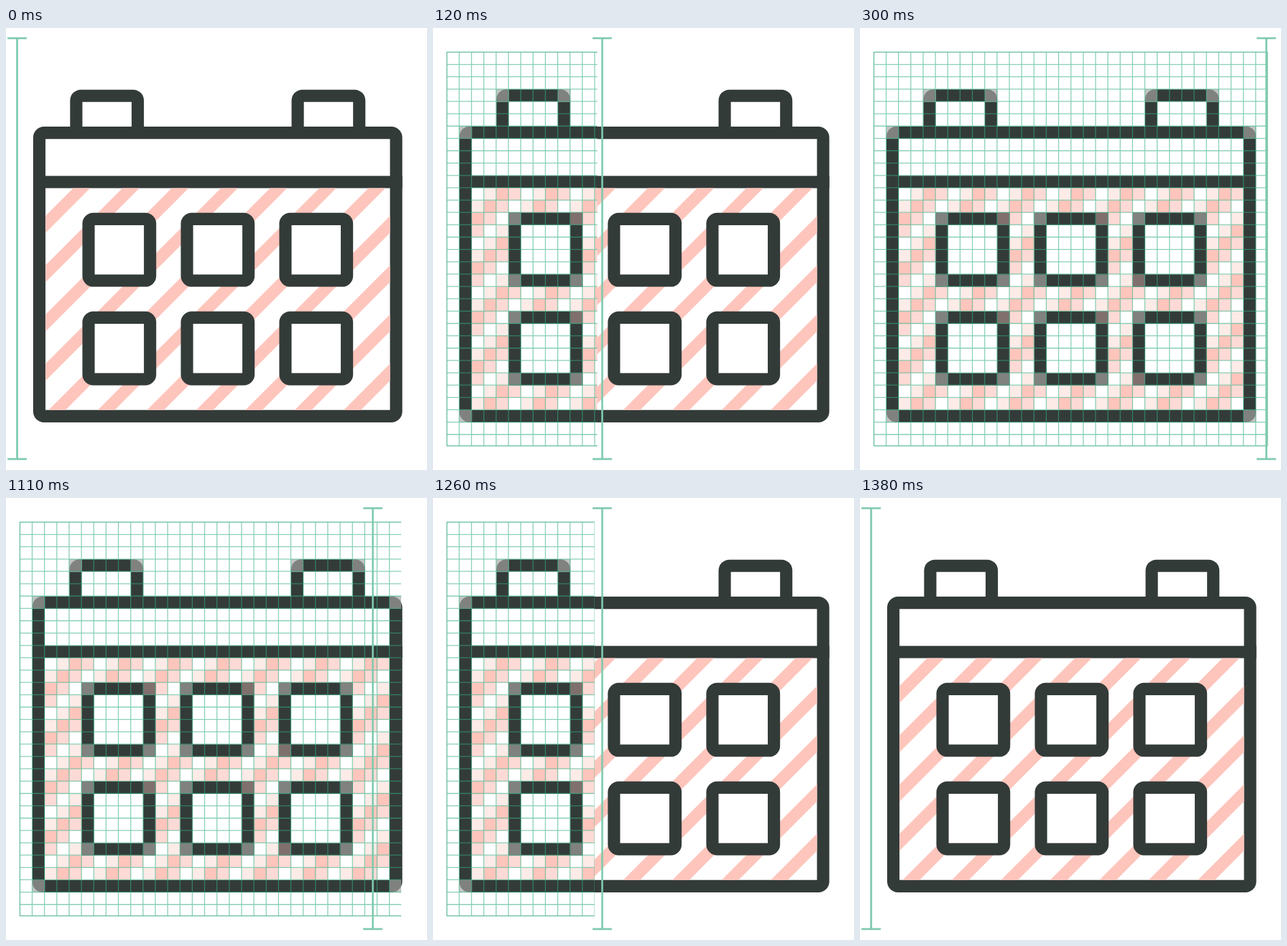
Animation, 620 px wide and 650 px high, one loop 2.25 s. Source, as an HTML page with a canvas:

```html
<!DOCTYPE html>
<html lang="en">
<head>
<meta charset="utf-8">
<title>Calendar icon on a pixel grid</title>
<style>
  html, body { margin: 0; width: 100%; height: 100%; overflow: hidden; background: #fff; }
  canvas { display: block; }
</style>
</head>
<body>
<canvas id="stage" width="620" height="650"></canvas>
<script>
const ctx = document.getElementById('stage').getContext('2d');
const DARK = '#333b39', PINK = '#fec5bc', GREEN = '#7fcaae';
const LOOP = 2250, STEP = 30;

// Outlines in grid units: column, row, width, height
const BODY = [1, 6, 30, 24];
const TABS = [[4, 3, 6, 4], [22, 3, 6, 4]];
const DAYS = [13, 21].flatMap(row => [5, 13, 21].map(col => [col, row, 6, 6]));

function layer(draw) {
  const canvas = document.createElement('canvas');
  canvas.width = 620;
  canvas.height = 650;
  draw(canvas.getContext('2d'));
  return canvas;
}

const smooth = layer(g => {
  const unit = 18.12;
  const X = col => 21.9 + unit * col;
  const Y = row => 36.3 + unit * row;
  const box = (col, row, w, h, color, radius = 0) => {
    g.fillStyle = color;
    g.beginPath();
    g.roundRect(X(col), Y(row), w * unit, h * unit, radius);
    g.fill();
  };
  const frame = ([col, row, w, h]) => {
    box(col, row, w, h, DARK, 16);
    box(col + 1, row + 1, w - 2, h - 2, '#fff');
  };

  TABS.forEach(frame);
  frame(BODY);
  box(1, 10, 30, 1, DARK);

  g.save();
  g.beginPath();
  g.rect(X(2), Y(11), 28 * unit, 18 * unit);
  g.clip();
  g.strokeStyle = PINK;
  g.lineWidth = 17.6;
  for (let sum = 347; sum < 1150; sum += 4 * unit) {
    g.beginPath();
    g.moveTo(sum - 200, 200);
    g.lineTo(sum - 600, 600);
    g.stroke();
  }
  g.restore();
  DAYS.forEach(frame);
});

const pixelated = layer(g => {
  const unit = 18.14, left = 20.5, top = 35.5, width = 579.5, height = 579;
  const X = col => 20.8 + unit * col;
  const Y = row => 35.8 + unit * row;
  const box = (col, row, w, h, color, radii = 0) => {
    g.fillStyle = color;
    g.beginPath();
    g.roundRect(X(col), Y(row), w * unit, h * unit, radii);
    g.fill();
  };
  const corners = ([col, row, w, h]) => [
    [col, row], [col + w - 1, row], [col + w - 1, row + h - 1], [col, row + h - 1]
  ];
  const ring = ([col, row, w, h]) => {
    box(col, row, w, h, DARK);
    box(col + 1, row + 1, w - 2, h - 2, '#fff');
  };
  const softCorner = ([col, row], index) => {
    box(col, row, 1, 1, '#fff');
    box(col, row, 1, 1, '#c2c5c4');
    box(col, row, 1, 1, '#80827f', [0, 1, 2, 3].map(i => i === index ? 15 : 0));
  };

  g.fillStyle = '#fff';
  g.fillRect(left, top, width, height);
  TABS.forEach(ring);
  ring(BODY);
  box(1, 10, 30, 1, DARK);
  TABS.forEach(tab => corners(tab).slice(0, 2).forEach(softCorner));
  corners(BODY).forEach(softCorner);

  const shades = ['#fedad6', '#fff', '#fdebe8', PINK];
  for (let row = 11; row < 29; row++)
    for (let col = 2; col < 30; col++)
      box(col, row, 1, 1, shades[(col + row) % 4]);

  DAYS.forEach(day => {
    ring(day);
    corners(day).forEach(([col, row]) => {
      const tinted = (col + row) % 4 === 3 && [10, 18, 21].includes(col);
      box(col, row, 1, 1, tinted ? '#80706d' : '#80827f');
    });
  });

  g.strokeStyle = 'rgba(50, 175, 130, 0.6)';
  g.lineWidth = 1.3;
  g.beginPath();
  for (let i = 1; i < 32; i++) {
    const x = 20.4 + unit * i, y = 35.4 + unit * i;
    g.moveTo(x, top);
    g.lineTo(x, top + height);
    g.moveTo(left, y);
    g.lineTo(left + width, y);
  }
  g.stroke();
  g.strokeStyle = '#62bc99';
  g.strokeRect(left, top, width, height);
});

function drawBar(x) {
  ctx.fillStyle = GREEN;
  ctx.fillRect(x - 1.4, 15, 2.8, 619);
  ctx.fillRect(x - 14.2, 13.6, 28.4, 2.8);
  ctx.fillRect(x - 14.2, 632.5, 28.4, 2.8);
}

function render(t) {
  const returning = t >= 1110;
  const step = returning
    ? Math.max(0, 9 - Math.floor((t - 1110) / STEP))
    : Math.min(10, Math.floor(t / STEP));
  const edge = returning ? 68.8 * step - 37.2 : 68 * step - 30;

  ctx.fillStyle = '#fff';
  ctx.fillRect(0, 0, 620, 650);
  ctx.drawImage(smooth, 0, 0);
  if (step > 0) {
    ctx.save();
    ctx.beginPath();
    ctx.rect(0, 0, Math.round(edge), 650);
    ctx.clip();
    ctx.drawImage(pixelated, 0, 0);
    ctx.restore();
  }
  drawBar(16.4 + 58.2 * step);
}

const start = performance.now();
function tick() {
  render((performance.now() - start) % LOOP);
  requestAnimationFrame(tick);
}
tick();
</script>
</body>
</html>
```
